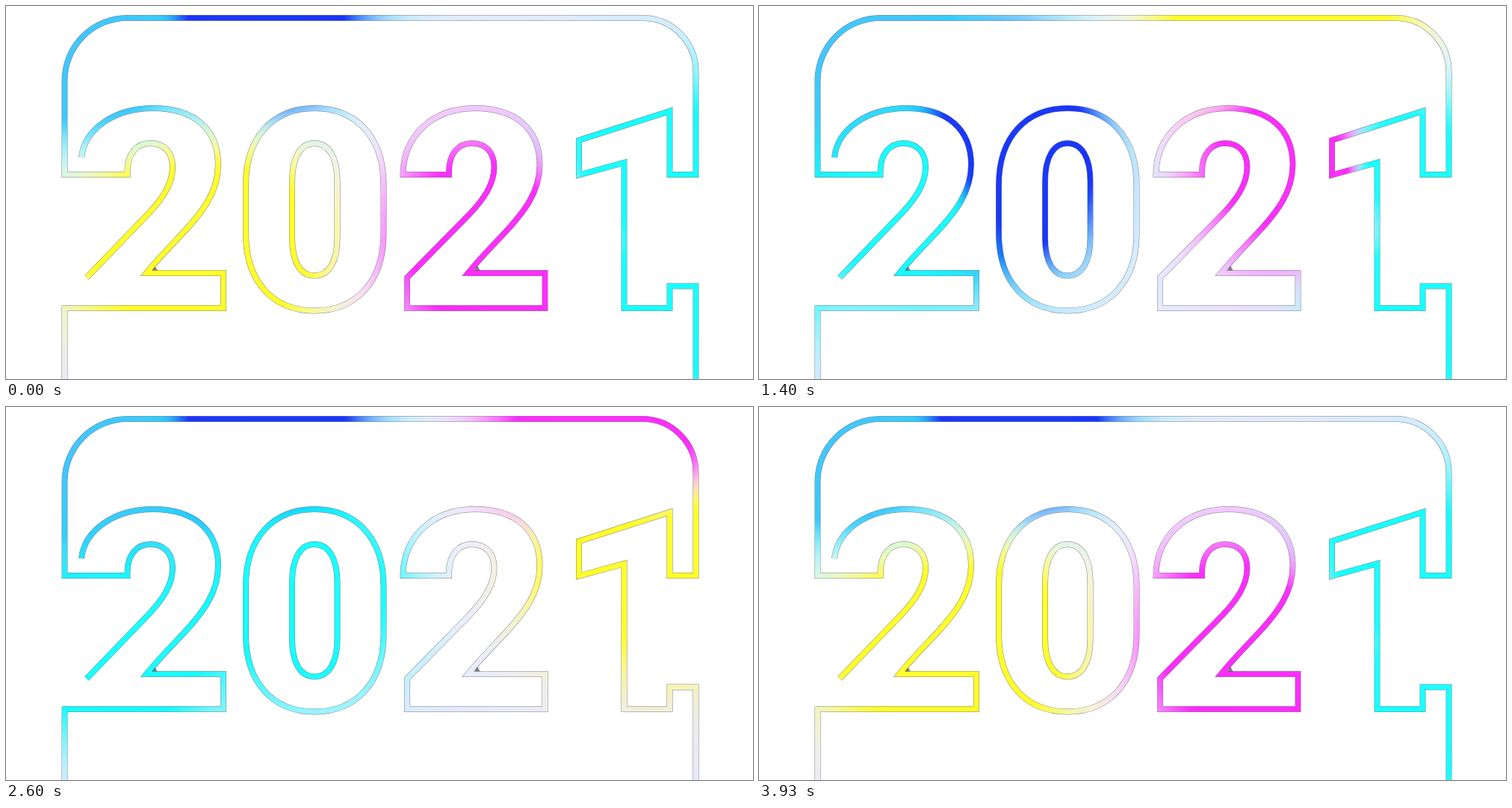
Recreate the animation shown at these times as an HTML page with a canvas. Size 1000 by 500 pixels, loop 3990 ms.

```html
<!DOCTYPE html>
<html lang="en">
<head>
<meta charset="utf-8">
<title>2021</title>
<style>
  html, body { margin: 0; width: 100%; height: 100%; overflow: hidden; background: #fff; }
  canvas { display: block; }
</style>
</head>
<body>
<canvas id="stage" width="1000" height="500"></canvas>
<script>
const LOOP = 3990, STEPS = 60, CELL = 8, REACH = 170;
const ctx = document.getElementById('stage').getContext('2d');
const field = document.createElement('canvas');
field.width = 1000 / CELL + 1;
field.height = Math.ceil(500 / CELL) + 1;
const fieldCtx = field.getContext('2d');
const image = fieldCtx.createImageData(field.width, field.height);

// Both twos share their hook, bowl and diagonal.
const bowl = `C252 137 284 165 284 213 C284 250 262 277 238 303
  C224 318 204 338 188 358 H291 V405`;
const inner = `L190 279 C210 258 223 238 223 216 C223 196 212 184 193 184
  C175 184 162.5 198 162.5 222 V226`;
const outline = new Path2D(`
  M101 203 C105 165 145 137 197 137 ${bowl} H75
  M78.5 500 V402
  M108 364 ${inner} H78.5 V100 A84 84 0 0 1 162.5 16
  H852 A71.5 72 0 0 1 923.5 88 V226 H888.5 V141 L767 180 V226.5 L827.5 210
  V405 H888.5 V375.5 H923.5 V500
  M321 240 C321 175 358 137 413 137 S505.5 175 505.5 240 V305
  C505.5 370 468 408.5 413 408.5 S321 370 321 305 Z
  M383 235 C383 203 394 184 413 184 S443.5 203 443.5 235 V311
  C443.5 343 432 361.5 413 361.5 S383 343 383 311 Z`);
outline.addPath(
  new Path2D(`M101 226 C101 175 140 137 197 137 ${bowl} H106.5 V364 ${inner} Z`),
  new DOMMatrix().translate(430.5, 0));
const notches = new Path2D('M195 355 l4 -7 l4 7 Z M627 355 l4 -7 l4 7 Z');

const clamp = v => Math.min(1, Math.max(0, v));
const ease = v => { const c = clamp(v); return c * c * (3 - 2 * c); };

// Moves from home to away between a and b, and back between c and d.
const swing = (home, away, a, b, c, d) => u => {
  const p = ease((u - a) / (b - a)) - ease((u - c) / (d - c));
  return home.map((v, i) => v + (away[i] - v) * p);
};

// One clockwise turn, slowest in the middle of the loop.
const orbit = u => {
  const turn = 2 * Math.PI * u;
  const angle = 2.58 + turn + 0.52 * Math.sin(turn);
  return [590 + 330 * Math.cos(angle), 200 + 210 * Math.sin(angle)];
};

const lights = [
  { hue: 'blue', at: swing([310, -15], [310, 175], 0, 0.22, 0.4, 0.62), twin: [30, 35] },
  { hue: 'sky', at: () => [120, 30], twin: [0, 20] },
  { hue: 'cyan', at: swing([-400, 320], [150, 320], 0, 0.6, 0.84, 1), twin: [250, -70] },
  { hue: 'cyan', at: swing([850, 215], [1300, 250], 0.52, 0.64, 0.84, 1), twin: [25, 185] },
  { hue: 'yellow', at: orbit, twin: [-100, 0] },
  { hue: 'magenta', at: swing([640, 310], [790, 20], 0.05, 0.75, 0.78, 1), twin: [50, 30] }
];

function sitesAt(u) {
  return lights.flatMap(({ hue, at, twin }) => {
    const [x, y] = at(u);
    return [{ hue, x, y }, { hue, x: x + twin[0], y: y + twin[1] }];
  });
}

const purity = w => Math.min(1, 1.5 * w ** 2.5);

// Hues absorb from a pale ground, so the seams between them stay pale.
function colourAt(x, y, sites) {
  const w = { blue: 0, sky: 0, cyan: 0, yellow: 0, magenta: 0, ground: REACH ** -4 };
  let sum = w.ground;
  for (const s of sites) {
    const v = ((x - s.x) ** 2 + (y - s.y) ** 2 + 400) ** -2;
    w[s.hue] += v;
    sum += v;
  }
  for (const hue in w) w[hue] /= sum;
  const coolSum = w.blue + w.sky + w.cyan;
  const cool = purity(coolSum);
  const deep = purity(w.blue / coolSum), sky = w.sky / coolSum;
  const tint = 0.12 * w.ground;
  const red = cool * (0.9 - 0.15 * sky) + tint;
  const green = cool * cool * (0.78 * deep + 0.22 * sky) + 0.82 * purity(w.magenta) + tint;
  const blue = 0.84 * purity(w.yellow);
  return [red, green, blue].map(v => 255 * (1 - v));
}

function paintField(u) {
  const sites = sitesAt(u);
  let i = 0;
  for (let row = 0; row < field.height; row++) {
    for (let col = 0; col < field.width; col++) {
      image.data.set([...colourAt((col + 0.5) * CELL, (row + 0.5) * CELL, sites), 255], i);
      i += 4;
    }
  }
  fieldCtx.putImageData(image, 0, 0);
}

function draw(u) {
  paintField(u);
  ctx.globalCompositeOperation = 'copy';
  ctx.drawImage(field, 0, 0, field.width * CELL, field.height * CELL);
  ctx.globalCompositeOperation = 'destination-in';
  ctx.strokeStyle = '#000';
  ctx.lineWidth = 7;
  ctx.stroke(outline);
  ctx.globalCompositeOperation = 'destination-over';
  ctx.strokeStyle = ctx.fillStyle = 'rgba(0,0,0,0.5)';
  ctx.lineWidth = 8;
  ctx.stroke(outline);
  ctx.fill(notches);
}

let shown = -1;
function tick() {
  const step = Math.floor((performance.now() % LOOP + 3) / LOOP * STEPS) % STEPS;
  if (step !== shown) draw(step / (STEPS - 1));
  shown = step;
  requestAnimationFrame(tick);
}
tick();
</script>
</body>
</html>
```
